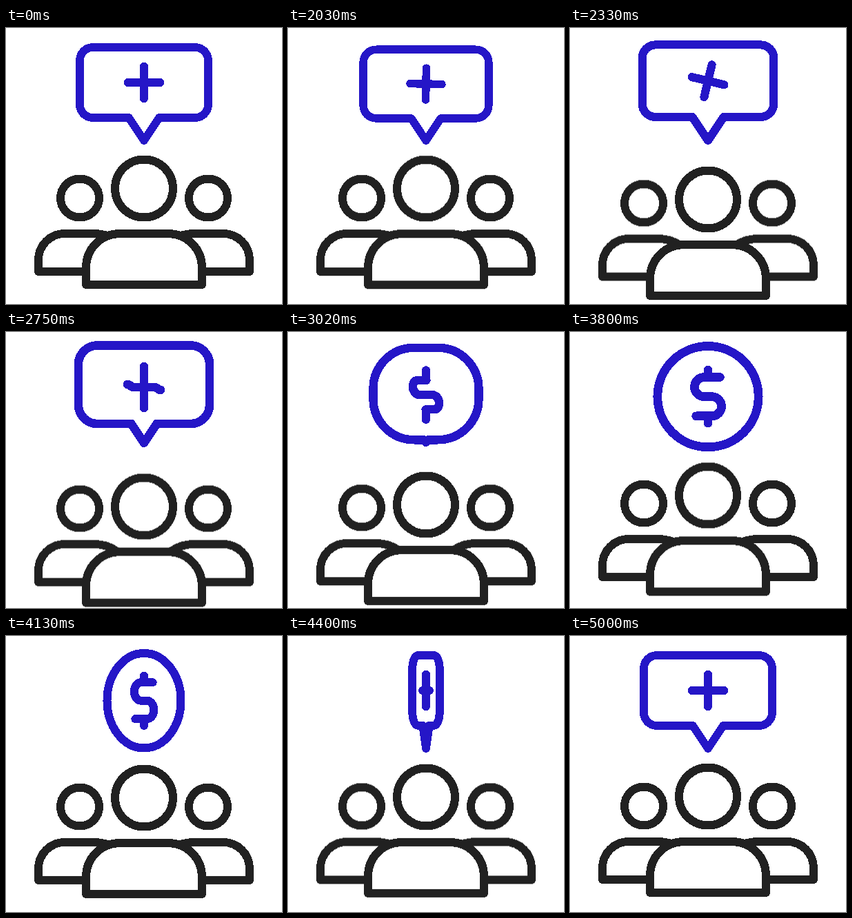
Write an HTML page that moves like this. It is 400 px wide and 400 px high and loops after 5.03 s.

```html
<!DOCTYPE html>
<html lang="en">
<head>
<meta charset="utf-8">
<title>Group message</title>
<style>
  html, body { margin: 0; width: 100%; height: 100%; overflow: hidden; background: #fff; }
  svg { display: block; width: 100vw; height: 100vh; shape-rendering: crispEdges; }
  g { fill: none; stroke-width: 12; stroke-linecap: round; stroke-linejoin: round; }
  #people { stroke: #212121; }
  #sign { stroke: #2516c7; }
  #sides { --dip: 9.5px; }
  #middle { --dip: 20.5px; }
  #sides, #middle { animation: dip 5030ms cubic-bezier(.26, 0, .19, 1) infinite; }
  @keyframes dip {
    0%, 39.76%, 99.4%, 100% { transform: translateY(0); }
    53.68% { transform: translateY(var(--dip)); }
  }
</style>
</head>
<body>
<svg viewBox="0 0 400 400">
  <g id="people">
    <g id="sides">
      <g id="side">
        <circle cx="107" cy="246.5" r="28"/>
        <path d="M116 353H47V336A38 38 0 0 1 85 298H128Q146 298 160 308"/>
      </g>
      <use href="#side" transform="matrix(-1 0 0 1 400 0)"/>
    </g>
    <g id="middle">
      <circle cx="200" cy="232.5" r="42"/>
      <path fill="#fff" d="M116 372V347A49 49 0 0 1 165 298H235A49 49 0 0 1 284 347V372Z"/>
    </g>
  </g>
  <g id="sign">
    <path id="frame"/>
    <path id="glyph"/>
  </g>
</svg>
<script>
const LOOP = 5030, HOLD = 2030, STEP = 30;

const BUBBLE = { w: 93, top: 28, bottom: 130, r: 19 };
const COIN = { w: 67.5, top: 26.2, bottom: 161.2, r: 67.5 };

const sign = document.getElementById('sign');
const frame = document.getElementById('frame');
const glyph = document.getElementById('glyph');

const mix = (a, b, u) => a + (b - a) * u;
const bump = (t, peak, width) => Math.exp(-(((t - peak) / width) ** 2));

function smooth(t, from, to) {
  const u = Math.min(1, Math.max(0, (t - from) / (to - from)));
  return u * u * (3 - 2 * u);
}

// squash, stretch, squash as a coin, spring back
function pulse(t) {
  if (t < HOLD) return 1;
  return 1 - 0.06 * bump(t, 2100, 80) + 0.065 * bump(t, 2760, 450)
    - 0.107 * bump(t, 3380, 160) + 0.085 * bump(t, 3760, 300);
}

function framePath(m, k, pt, s) {
  const [w, top, bottom, r] = Object.keys(BUBBLE).map(key => mix(BUBBLE[key], COIN[key], m));
  const W = w * k, R = Math.min(r * Math.sqrt(k), W);
  const fade = (1 - m) ** 1.5, tail = 22 * k * fade;
  const arc = (x, y) => `A${R * s} ${r * s} 0 0 1 ${pt(x, y)}`;
  return `M${pt(R - W, top)}L${pt(W - R, top)}${arc(W, top + r)}L${pt(W, bottom - r)}${arc(W - R, bottom)}` +
    `L${pt(tail, bottom)}L${pt(0, bottom + 33 * fade)}L${pt(-tail, bottom)}L${pt(R - W, bottom)}` +
    `${arc(-W, bottom - r)}L${pt(-W, top + r)}${arc(R - W, top)}Z`;
}

// the plus's bar bends into an S while its stem opens into two stubs
function glyphPath(m, at) {
  const steps = 16, half = [];
  for (let i = -1; i <= steps; i++) {
    const a = Math.PI * i / steps;
    const x = i < 0 ? 16 : -5 - 13 * Math.sin(a);
    const y = i < 0 ? -26 : -13 - 13 * Math.cos(a);
    half.push([mix(mix(-23.5, -14, (i + 1) / (steps + 1)), x, m * m), y * m]);
  }
  const mirror = half.map(([x, y]) => [-x, -y]).reverse();
  const end = mix(23.5, 35.5, Math.sqrt(m)), gap = 26 * m;
  const line = points => 'M' + points.map(at).join('L');
  return line([...half, ...mirror]) + line([[0, -end], [0, -gap]]) + line([[0, end], [0, gap]]);
}

function draw(now) {
  let t = now % LOOP;
  t = t < HOLD ? 0 : t - (t - HOLD) % STEP;

  const flip = Math.cos(Math.PI * smooth(t, 3800, 4900));
  const m = flip < 0 ? 0 : smooth(t, 2608, 3200);
  const k = Math.abs(flip), s = pulse(t);
  const anchor = mix(168, 93.7, m);
  const pt = (x, y) => `${(200 + x * s).toFixed(2)} ${(anchor + (y - anchor) * s).toFixed(2)}`;

  const mid = mix(79, 93.7, Math.sqrt(m));
  const turn = Math.PI * smooth(t, 2000, 2600);
  const c = Math.cos(turn), n = Math.sin(turn);
  const at = ([x, y]) => pt((x * c - y * n) * k, mid + x * n + y * c);

  frame.setAttribute('d', framePath(m, k, pt, s));
  glyph.setAttribute('d', glyphPath(m, at));
  sign.style.strokeWidth = 11.8 * s;
}

let start;
function tick(now) {
  start ??= now;
  draw(now - start);
  requestAnimationFrame(tick);
}
draw(0);
requestAnimationFrame(tick);
</script>
</body>
</html>
```
